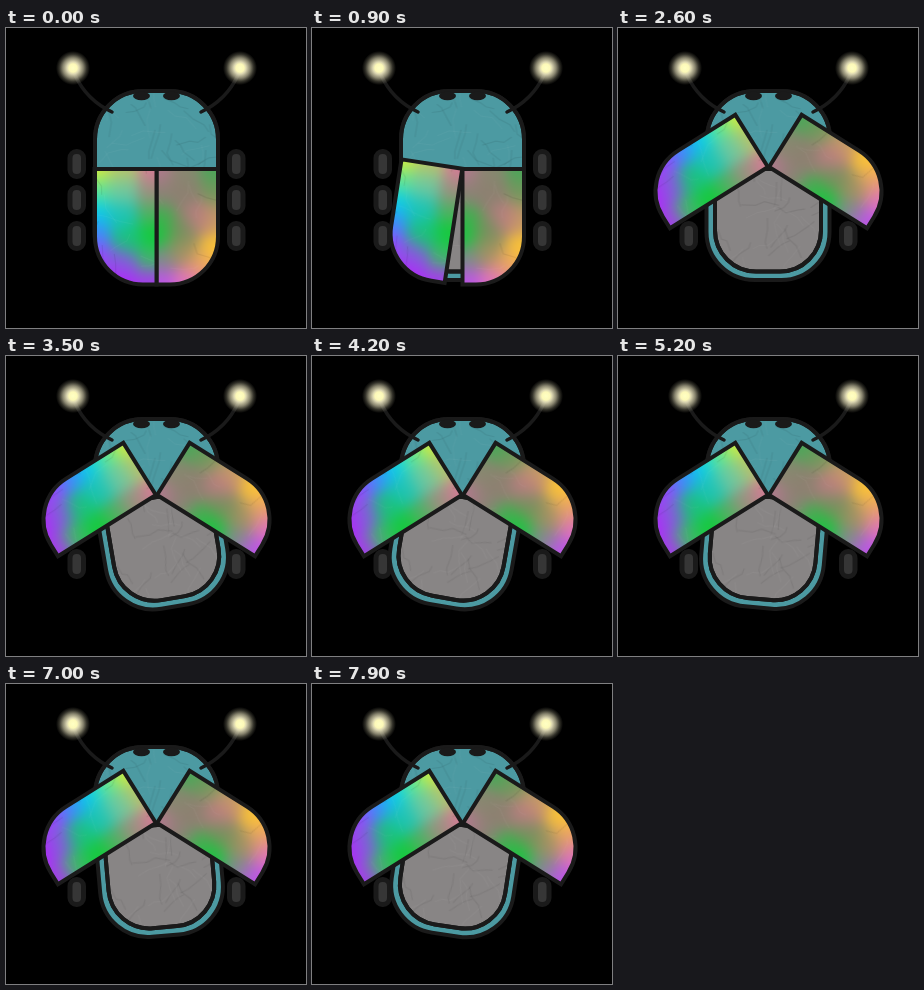
An HTML page with a canvas for the animation above (8 s loop, 300 px wide and 300 px high).

```html
<!DOCTYPE html>
<html lang="en">
<head>
<meta charset="utf-8">
<title>Beetle</title>
<style>
html, body { margin: 0; width: 100%; height: 100%; overflow: hidden; background: #000; }
canvas { display: block; width: 300px; height: 300px; }
</style>
</head>
<body>
<canvas id="stage" width="300" height="300"></canvas>
<script>
const ctx = document.getElementById('stage').getContext('2d');
const LOOP = 8000, STEP = 100;
const CX = 150.5, CY = 141;
const INK = '#1a1a1a', TEAL = '#4c9aa2', GRAY = '#888585';
const OPEN = 58, SWAY = 10;
const rad = deg => deg * Math.PI / 180;

// Sine ease from 0 to 1 between two times
function ease(t, from, to) {
  const p = Math.min(1, Math.max(0, (t - from) / (to - from)));
  return (1 - Math.cos(Math.PI * p)) / 2;
}

function random(seed) {
  return () => (seed = (seed * 16807) % 2147483647) / 2147483647;
}

// Faint creases of crumpled paper
function paper(w, h, seed, count) {
  const c = document.createElement('canvas');
  c.width = w; c.height = h;
  const g = c.getContext('2d'), rnd = random(seed);
  g.lineWidth = 1.2;
  for (let i = 0; i < count; i++) {
    let x = rnd() * w, y = rnd() * h;
    const dir = rnd() * 6.28;
    g.strokeStyle = i % 2 ? 'rgba(0,0,0,0.07)' : 'rgba(255,255,255,0.04)';
    g.beginPath();
    g.moveTo(x, y);
    for (let k = 0; k < 3; k++) {
      const a = dir + rnd() - 0.5, len = 5 + rnd() * 10;
      x += Math.cos(a) * len;
      y += Math.sin(a) * len;
      g.lineTo(x, y);
    }
    g.stroke();
  }
  return c;
}

// Smooth colour mesh: each pixel mixes the spots by distance
function mesh(spots, seed) {
  const w = 66, h = 120, c = document.createElement('canvas');
  c.width = w; c.height = h;
  const g = c.getContext('2d'), img = g.createImageData(w, h);
  const pts = spots.map(([x, y, hex]) => {
    const n = parseInt(hex, 16);
    return { x, y, rgb: [n >> 16, n >> 8 & 255, n & 255] };
  });
  for (let y = 0; y < h; y++) for (let x = 0; x < w; x++) {
    const mix = [0, 0, 0];
    let sum = 0;
    for (const p of pts) {
      const d = (x - p.x) ** 2 + (y - p.y) ** 2;
      const k = Math.exp(-d / 280);
      sum += k;
      for (let i = 0; i < 3; i++) mix[i] += k * p.rgb[i];
    }
    const o = (y * w + x) * 4;
    for (let i = 0; i < 3; i++) img.data[o + i] = mix[i] / sum;
    img.data[o + 3] = 255;
  }
  g.putImageData(img, 0, 0);
  g.drawImage(paper(w, h, seed, 12), 0, 0);
  return c;
}

// Spots are measured from the top left of each wing
const leftSkin = mesh([
  [0, 0, 'e0f030'], [28, 0, 'b8c468'], [62, 0, 'd87898'], [60, 24, 'a08c80'],
  [0, 22, '60e890'], [0, 44, '00d0f0'], [28, 24, '70c8a0'], [28, 48, '18c4b8'],
  [60, 46, '50b060'], [62, 68, '08d030'], [34, 72, '18c478'], [0, 66, '4088ff'],
  [0, 88, 'a040ff'], [28, 96, '8858e0'], [60, 90, '40b868'], [24, 116, 'b820ff'],
  [60, 116, 'a838f0']
], 41);
const rightSkin = mesh([
  [0, 0, 'b47890'], [30, 0, '888870'], [62, 0, '48a858'], [0, 26, '908078'],
  [30, 26, '8c8070'], [62, 26, '70985c'], [0, 50, '40b050'], [0, 68, '08d038'],
  [26, 62, '70905c'], [44, 50, 'c07888'], [62, 52, 'c8a060'], [28, 84, 'a09060'],
  [62, 80, 'ffc830'], [48, 98, 'f0a860'], [4, 92, '808890'], [4, 116, 'c050f0'],
  [34, 114, 'e070c0']
], 77);
const headPaper = paper(128, 82, 9, 34);
const bellyPaper = paper(110, 106, 23, 34);

function ink(width = 4) {
  ctx.lineWidth = width;
  ctx.strokeStyle = INK;
  ctx.stroke();
}

function box(x, y, w, h, radii, fill, line) {
  ctx.beginPath();
  ctx.roundRect(x, y, w, h, radii);
  ctx.fillStyle = fill;
  ctx.fill();
  ink(line);
}

function texture(img, x, y) {
  ctx.save();
  ctx.clip();
  ctx.drawImage(img, x, y);
  ctx.restore();
  ink();
}

// Draws once as is and once flipped around the centre line
function both(draw) {
  for (const side of [1, -1]) {
    ctx.save();
    ctx.translate(CX, 0);
    ctx.scale(side, 1);
    draw();
    ctx.restore();
  }
}

// Draws around the hinge, which may sit beside the centre
function turned(deg, draw, dx = 0, dy = 0) {
  ctx.save();
  ctx.translate(CX + dx, CY + dy);
  ctx.rotate(rad(deg));
  ctx.translate(-dx, -dy);
  draw();
  ctx.restore();
}

function legs() {
  for (const y of [123.5, 159.5, 195.5]) box(-86.5, y, 13.5, 25, 6.5, '#363636', 5);
}

function antenna() {
  ctx.beginPath();
  ctx.moveTo(-44.5, 84);
  ctx.quadraticCurveTo(-70, 72, -81.5, 47);
  ctx.lineCap = 'round';
  ink(3.5);
  const glow = ctx.createRadialGradient(-83.5, 40, 0, -83.5, 40, 17);
  glow.addColorStop(0, '#ffffc4');
  glow.addColorStop(0.24, '#fdf9b8');
  glow.addColorStop(0.36, 'rgba(238,232,192,0.92)');
  glow.addColorStop(0.6, 'rgba(226,220,184,0.6)');
  glow.addColorStop(0.8, 'rgba(215,210,175,0.24)');
  glow.addColorStop(1, 'rgba(200,195,160,0)');
  ctx.fillStyle = glow;
  ctx.fillRect(-101, 22, 35, 36);
}

function eye() {
  ctx.beginPath();
  ctx.ellipse(-15, 68, 8.5, 4.2, 0, 0, 7);
  ctx.fillStyle = INK;
  ctx.fill();
}

function belly() {
  box(-62, 0, 123, 111, [0, 0, 48, 48], TEAL, 4);
  box(-53.5, 0, 106, 102.5, [0, 0, 41, 41], GRAY, 4);
  texture(bellyPaper, -55, 0);
}

function head() {
  box(CX - 61.5, 63, 123, 78, [48, 48, 0, 0], TEAL, 4);
  texture(headPaper, CX - 64, 61);
}

function wing(side, skin) {
  const x = side < 0 ? -61.5 : 0;
  ctx.beginPath();
  ctx.roundRect(x, 0, 61.5, 115.5, side < 0 ? [0, 0, 0, 48] : [0, 0, 48, 0]);
  texture(skin, x - 2, -2);
}

function sway(t) {
  if (t < 3600) return -SWAY * ease(t, 2700, 3600);
  return -SWAY * Math.cos(2 * Math.PI * (t - 3600) / 1200);
}

function draw(t) {
  ctx.fillStyle = '#000';
  ctx.fillRect(0, 0, 300, 300);
  both(legs);
  turned(sway(t), belly);
  head();
  both(eye);
  both(antenna);
  turned(-OPEN * ease(t, 1030, 2580), () => wing(1, rightSkin), -1.5, -1.5);
  turned(OPEN * ease(t, 340, 2540), () => wing(-1, leftSkin), 1.5, -1.5);
}

const start = performance.now();
function tick() {
  const t = (performance.now() - start) % LOOP;
  draw(Math.floor(t / STEP) * STEP);
  requestAnimationFrame(tick);
}
tick();
</script>
</body>
</html>
```
